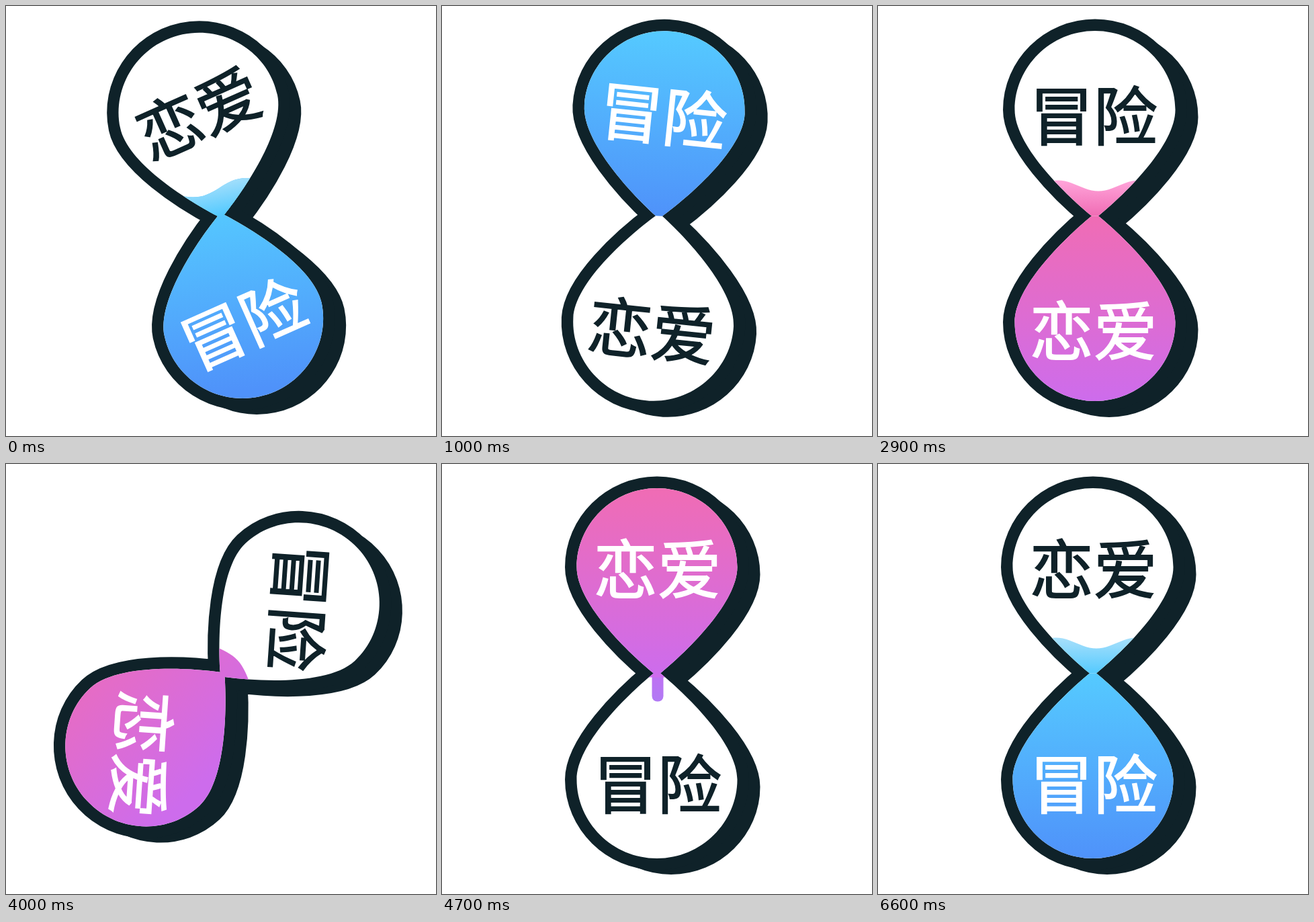
Write an HTML page with a canvas that moves like this. It is 640x640 px and loops after 7200 ms.

```html
<!DOCTYPE html>
<html lang="zh-CN">
<head>
<meta charset="utf-8">
<title>Hourglass</title>
<style>
  html, body { margin: 0; width: 100%; height: 100%; overflow: hidden; background: #fff; }
  canvas { display: block; width: 640px; height: 640px; }
</style>
</head>
<body>
<canvas id="stage" width="640" height="640"></canvas>
<script>
const ctx = document.getElementById('stage').getContext('2d');
const HALF = 3600, STEP = 100, RAD = Math.PI / 180;
const PIVOT = [321.5, 312], TEXT_PIVOT = [320.8, 320];
const DARK = '#0f2229', WHITE = '#ffffff';
// spin: way the gradient turns; far, near: how much its ends move out while it does
const BLUE = { hi: '#55caff', lo: '#4f92fa', light: '#a8e0fb', spin: 1, far: 200, near: 138 };
const PINK = { hi: '#f06cb4', lo: '#cd6cec', light: '#ffa5da', spin: -1, far: 80, near: 40 };
const STREAM = [['#8480dd', '#d078c8', '#bb8bd8'], ['#c070f2', '#6aa8ff', '#8fa8f4']];

// Tables of [time, value]
const TURN = [[0, -12], [100, -16], [200, -13], [300, 9], [400, 47], [500, 108], [600, 157],
  [700, 186], [800, 196], [900, 193], [1000, 183], [1100, 180]];
const REST_LEVEL = [[0, 41], [400, 24], [500, 33], [600, 34], [800, 24], [1000, 0], [1100, -8]];
const REST_PHASE = [[0, -23], [400, -60], [500, -50], [1100, 40]];
const DRAIN = [[1100, 300], [1600, 268], [1900, 236], [2200, 212], [2400, 180], [2600, 130], [2800, 70], [2900, 45]];
const DRAIN_PHASE = [[1100, 218], [1900, 48], [2900, -245]];
const FILL = [[1400, 290], [1900, 246], [2400, 190], [2700, 90], [2900, 0]];
// Splash drops: [age at 1900 ms, reach]
const DROPS = [[.45, -207], [.2, -170], [.33, 127], [.06, 216]];

const clamp = v => Math.max(0, Math.min(1, v));
const smooth = v => { v = clamp(v); return v * v * (3 - 2 * v); };

function at(table, t) {
  if (t <= table[0][0]) return table[0][1];
  for (let i = 1; i < table.length; i++) {
    const [t0, a] = table[i - 1], [t1, b] = table[i];
    if (t <= t1) return a + (b - a) * (t - t0) / (t1 - t0);
  }
  return table[table.length - 1][1];
}

function mix(a, b, k) {
  const part = (c, i) => parseInt(c.slice(i, i + 2), 16);
  return '#' + [1, 3, 5].map(i =>
    Math.round(part(a, i) + (part(b, i) - part(a, i)) * k).toString(16).padStart(2, '0')).join('');
}

function gradient(x0, y0, x1, y1, from, to) {
  const g = ctx.createLinearGradient(x0, y0, x1, y1);
  g.addColorStop(0, from);
  g.addColorStop(1, to);
  return g;
}

// One bulb hanging from the neck: s = 1 down, -1 up
function bulb(s) {
  const p = new Path2D();
  p.moveTo(-5, 0);
  p.bezierCurveTo(-50, s * 37, -119.5, s * 107, -119.5, s * 158);
  p.bezierCurveTo(-119.5, s * 222, -66, s * 275.5, 0, s * 275.5);
  p.bezierCurveTo(66, s * 275.5, 119.5, s * 222, 119.5, s * 158);
  p.bezierCurveTo(119.5, s * 107, 50, s * 37, 5, 0);
  p.closePath();
  return p;
}

const GLASS = new Path2D();
GLASS.addPath(bulb(-1));
GLASS.addPath(bulb(1));

function placeGlass(phi, dx, dy) {
  ctx.translate(PIVOT[0] + dx, PIVOT[1] + dy);
  ctx.rotate(phi);
  ctx.translate(-1.5, -.5);
}

function outline(phi, dx, dy, width) {
  ctx.save();
  placeGlass(phi, dx, dy);
  ctx.fillStyle = ctx.strokeStyle = DARK;
  ctx.lineWidth = width;
  ctx.lineJoin = 'round';
  ctx.fill(GLASS);
  ctx.stroke(GLASS);
  ctx.restore();
}

// Fills the area between two level functions of x
function band(low, high, paint) {
  ctx.beginPath();
  for (let x = -125; x <= 125; x += 5) ctx.lineTo(x, low(x));
  for (let x = 125; x >= -125; x -= 5) ctx.lineTo(x, high(x));
  ctx.closePath();
  ctx.fillStyle = paint;
  ctx.fill();
}

const flat = y => () => y;
const wave = (x, x0, len) => Math.cos(2 * Math.PI * (x - x0) / len);

function drawTurning(u, now) {
  const k = 180 * smooth((u + 100) / 1000) * RAD;
  const dx = -Math.sin(k) * now.spin, dy = Math.cos(k);
  const far = -138 - now.far * Math.sin(k), near = 138 - now.near * Math.sin(k);
  const level = at(REST_LEVEL, u), x0 = at(REST_PHASE, u);
  const amp = u < 900 ? 7 : 0;
  const top = x => -(level - amp * wave(x, x0, 120));
  band(top, flat(300), gradient(dx * far, 138 + dy * far, dx * near, 138 + dy * near, now.hi, now.lo));
  ctx.globalAlpha = clamp(1 - u / 300);
  band(top, flat(0), gradient(0, -52, 0, -2, now.light, now.hi));
  ctx.globalAlpha = 1;
}

function pipe(from, to, paint) {
  if (to - from < 4) return;
  ctx.beginPath();
  ctx.roundRect(-9.5, -to, 17, to - from, 8);
  ctx.fillStyle = paint;
  ctx.fill();
}

function drawStream(u, level, flip) {
  const [top, end, rest] = STREAM[flip];
  const head = 42 + (u - 1100) * .8;
  const second = 106 + (u - 1900) * .8;
  const tail = Math.max(-10, (u - 2500) * .8);
  const floor = level + 9;
  if (u < 1800) {
    pipe(-10, Math.min(head, floor), gradient(0, 0, 0, -240, top, end));
  } else {
    pipe(second + 26, floor, rest);
    pipe(tail, Math.min(second, floor), gradient(0, 0, 0, -106, top, end));
  }
}

function drawDrops(u, level, color) {
  if (u < 1500 || u > 2600) return;
  ctx.strokeStyle = color;
  ctx.lineWidth = 12;
  ctx.lineCap = 'round';
  for (const [age, reach] of DROPS) {
    const a = (age + (u - 1900) / 500 + 2) % 1;
    const x = -reach * a, y = -level + 54 * 4 * a * (1 - a);
    const dir = Math.atan2(54 * 4 * (1 - 2 * a), -reach);
    const h = Math.min(14, 60 * a) / 2;
    ctx.beginPath();
    ctx.moveTo(x - h * Math.cos(dir), y - h * Math.sin(dir));
    ctx.lineTo(x + h * Math.cos(dir), y + h * Math.sin(dir));
    ctx.stroke();
  }
}

function drawDraining(u, flip, now, next) {
  const d = at(DRAIN, u), e = at(FILL, u);
  const m = smooth((u - 1900) / 1000);
  const f = clamp(1 - e / 246);
  const mid = mix(next.light, next.hi, .5);
  drawStream(u, e, flip);
  drawDrops(u, e, mid);
  const fillAmp = 8 * clamp(e / 100);
  band(flat(-300), x => -(e + fillAmp * wave(x, 8, 120)),
    gradient(0, -e, 0, -276, mix(next.light, next.hi, f), mix(mid, next.lo, f)));
  const amp = at([[1900, 18], [2900, 8]], u), len = at([[1900, 215], [2900, 120]], u);
  const x0 = at(DRAIN_PHASE, u);
  band(flat(u < 2900 ? -6 : 0), x => d - amp * wave(x, x0, len),
    gradient(0, Math.min(276, d + amp), 0, 0, mix(now.hi, next.light, m), mix(now.lo, next.hi, m)));
}

// The word circles the pivot and spins once more about its own middle
function label(text, radius, phi, color) {
  ctx.save();
  ctx.translate(...TEXT_PIVOT);
  ctx.translate(-radius * Math.sin(phi), radius * Math.cos(phi));
  ctx.rotate(2 * phi);
  ctx.font = '400 95px "Noto Sans CJK SC", "Noto Sans CJK", sans-serif';
  ctx.textAlign = 'center';
  ctx.fillStyle = ctx.strokeStyle = color;
  ctx.lineWidth = 1.8;
  ctx.lineJoin = 'miter';
  ctx.miterLimit = 3;
  ctx.fillText(text, 0, 36);
  ctx.strokeText(text, 0, 36);
  ctx.restore();
}

function draw(time) {
  const t = Math.floor(time / STEP) * STEP % (2 * HALF);
  const flip = t >= HALF ? 1 : 0;
  let u = t % HALF;
  // The second pour takes a little longer
  if (u > 1900) u = Math.min(2900, 1900 + (u - 1900) / (1 + .1 * flip));
  const phi = (at(TURN, u) + 180 * flip) * RAD;
  const [now, next] = flip ? [PINK, BLUE] : [BLUE, PINK];

  ctx.fillStyle = WHITE;
  ctx.fillRect(0, 0, 640, 640);
  outline(phi, 21, 11, 26);
  outline(phi, 0, 0, 35);

  ctx.save();
  placeGlass(phi, 0, 0);
  ctx.fillStyle = WHITE;
  ctx.fill(GLASS);
  ctx.clip(GLASS);
  ctx.rotate(Math.PI * flip);
  if (u < 1100) drawTurning(u, now);
  else drawDraining(u, flip, now, next);
  ctx.restore();

  const k = smooth((u - 1780) / 1120);
  const fading = mix(WHITE, DARK, k), rising = mix(DARK, WHITE, k);
  label('恋爱', -163.5, phi, flip ? fading : rising);
  label('冒险', 156.5, phi, flip ? rising : fading);
}

const start = performance.now();
function loop() {
  draw(performance.now() - start);
  requestAnimationFrame(loop);
}
loop();
</script>
</body>
</html>
```
